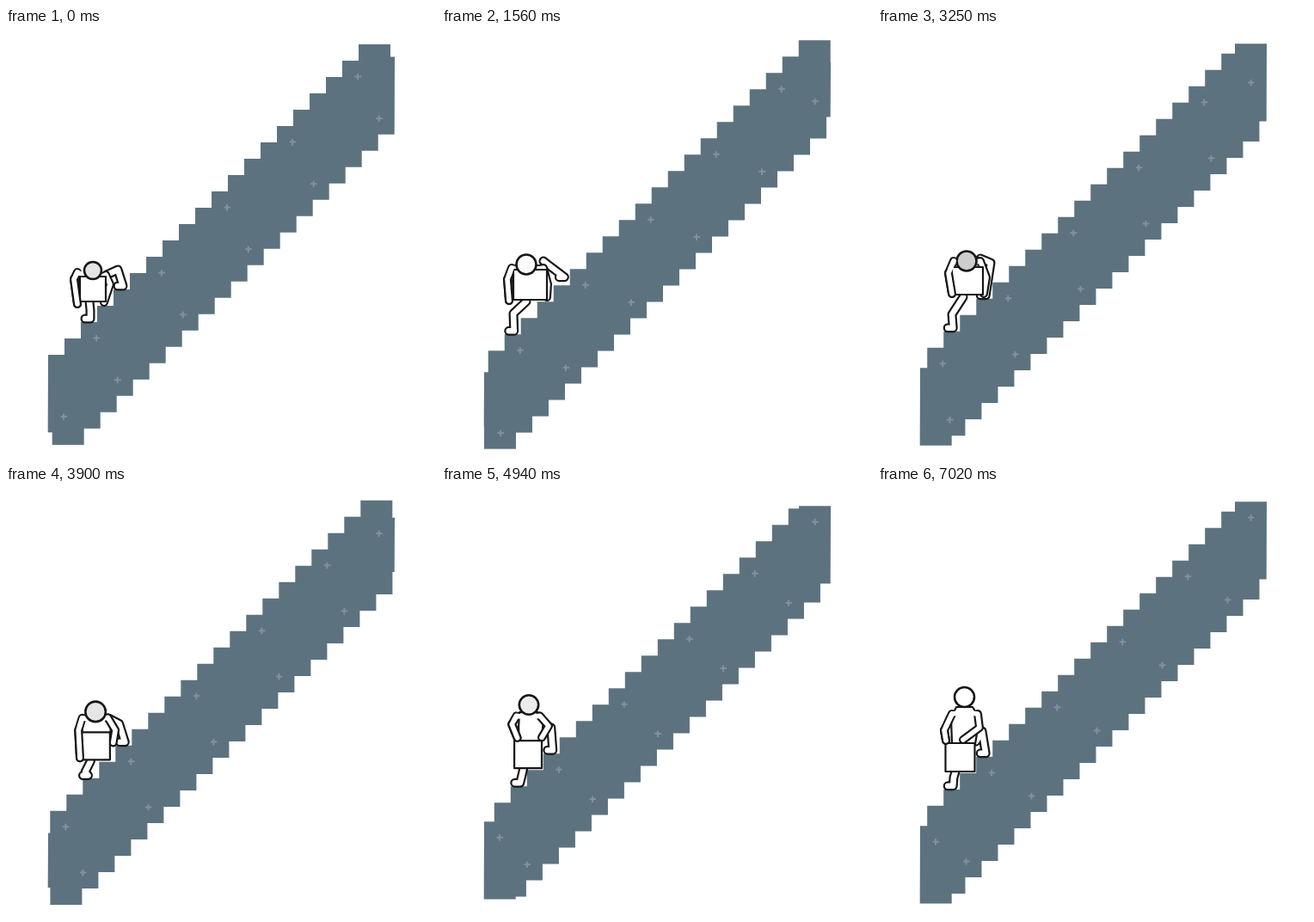
An HTML page with a canvas that plays this animation: 500x500 px, repeating every 8000 ms.

```html
<!DOCTYPE html>
<html lang="en">
<head>
<meta charset="utf-8">
<title>Climbing the endless stairs</title>
<style>
  html, body { margin: 0; width: 100%; height: 100%; overflow: hidden; background: #fff; }
  canvas { display: block; width: 100vw; height: 100vh; }
</style>
</head>
<body>
<canvas id="stage" width="500" height="500"></canvas>
<script>
const ctx = document.getElementById('stage').getContext('2d');
const LOOP = 8000, STEP = 19, ROOT2 = Math.SQRT2, INK = '#161616';

// Each pose: at = tick, shade = grey of the head, limbs as point lists.
const poses = [
  { at: 0, shade: [228], head: [101, 282, 10], box: [86, 289, 30, 29],
    torso: [86, 318, 84, 300, 86, 287, 117, 288, 118, 303, 115, 318],
    armL: [83, 284, 79, 292, 83, 321], armR: [116, 287, 121, 298, 114, 319],
    legL: [97, 318, 98, 328], legR: [117, 287, 130, 281] },
  { at: 12, shade: [250], head: [98, 275, 11.5], box: [83, 281, 39, 35],
    torso: [86, 316, 82, 295, 84, 276, 118, 276, 123, 295, 124, 316],
    armL: [81, 279, 76, 292, 78, 317], armR: [118, 279, 123, 298, 122, 313],
    legL: [98, 318, 83, 332], legR: [118, 271, 127, 278] },
  { at: 20, shade: [215], head: [97, 299, 9.5], box: [81, 297, 33, 26],
    torso: [78, 318, 76, 292, 86, 275, 107, 274, 118, 287, 117, 318],
    armL: [80, 292, 80, 313, 84, 327], armR: [114, 293, 115, 313, 113, 324],
    legL: [94, 322, 93, 332], legR: [116, 284, 125, 288] },
  { at: 25, shade: [205], head: [103, 271, 11.5], box: [86, 278, 36, 32],
    torso: [87, 308, 84, 290, 90, 268, 117, 267, 123, 285, 122, 308],
    armL: [88, 271, 82, 285, 86, 309], armR: [119, 271, 126, 290, 123, 309],
    legL: [99, 313, 86, 333], legR: [119, 268, 131, 273] },
  { at: 34, shade: [250], head: [105, 255.5, 12], box: [87.5, 293, 32.5, 32],
    torso: [92, 296, 92, 278, 94, 264, 115, 264, 121, 278, 119, 296],
    armL: [89, 269, 86, 283, 86, 322], armR: [118, 268, 128, 279, 126, 290],
    legL: [98, 325, 97, 332], legR: [120, 272, 132, 279] },
  { at: 44, shade: [215], head: [95, 253, 10], box: [79, 301, 31, 32],
    torso: [85, 300, 85, 280, 84, 262, 106, 262, 112, 278, 110, 298],
    armL: [83, 265, 74, 268, 90, 249], armR: [107, 266, 118, 279, 101, 296],
    legL: [90, 332, 88, 338], legR: [112, 298, 119, 284] },
  { at: 54, shade: [255], head: [100.5, 245.5, 11.5], box: [78.5, 299, 34, 33],
    torso: [86, 300, 85, 270, 91, 257, 110, 257, 118, 270, 113, 300],
    armL: [86, 265, 77, 284, 79, 296], armR: [116, 265, 118, 281, 99, 295],
    legL: [90, 332, 88, 339], legR: [114, 297, 121, 285] }
];

// 130 ms ticks while climbing, 260 ms while resting
function tickAt(t) {
  const n = t < 5200 ? Math.floor(t / 130) : 40 + 2 * Math.floor((t - 5200) / 260);
  return Math.min(n, 54);
}

const travel = n => 1.19 * (n >= 44 ? 41 : Math.min(n, 40));

const turn = (x, y) => [500.7 - x, 503.7 - y];

// Upper outline of the stairs, left to right, for a phase d within one step
function upperEdge(d) {
  const rising = 13.6 + (STEP - d) * ROOT2;
  const pts = [];
  for (let k = 20; k >= 0; k--) {
    const x = 415 - d - STEP * k;
    if (x + STEP <= 49) continue;
    const over = 49 - x;
    const y = over > 0 ? 380 + over * ROOT2 : 14 + d + STEP * k;
    const end = k > 0 ? x + STEP : rising < y ? 415 : 452 - d;
    pts.push([Math.max(49, x), y], [end, y]);
  }
  pts.push([pts.at(-1)[0], rising], [452, rising]);
  return pts;
}

// Closed belt: down the upper row, drop, up the lower row, rise
function beltPoint(u) {
  const v = u % 418, run = Math.min(v, 366);
  const x = 433 - run;
  const y = 32.5 + run + (v - run) * 73 / 52;
  return u >= 418 ? turn(x, y) : [x, y];
}

function drawStairs(shift) {
  const upper = upperEdge((5 + shift) % STEP);
  const lower = upper.map(([x, y]) => turn(x, y));
  trace([...upper, ...lower].flat());
  ctx.fillStyle = '#5d727f';
  ctx.fill();
  ctx.fillStyle = '#80929d';
  for (let i = 0; i < 11; i++) {
    const [x, y] = beltPoint((24 + shift + 76 * i) % 836);
    ctx.fillRect(x - 3.5, y - 1, 7.5, 2);
    ctx.fillRect(x - 1, y - 3.5, 2, 7.5);
  }
}

function poseAt(n) {
  let i = 0;
  while (i < poses.length - 2 && n >= poses[i + 1].at) i++;
  const a = poses[i], b = poses[i + 1];
  const p = (n - a.at) / (b.at - a.at);
  const pose = {};
  for (const key in a) {
    if (key !== 'at') pose[key] = a[key].map((v, j) => v + (b[key][j] - v) * p);
  }
  return pose;
}

// A foot rides its step down, then swings up to the next one
function foot(x, y, phase, lift, land, swingX, swingY) {
  const c = phase < land - STEP ? phase + STEP : phase;
  if (c <= lift) return [x + 5 - c, y - 5 + c];
  const p = (c - lift) / (land - lift);
  const arc = Math.sin(Math.PI * p);
  const ride = lift + (land - STEP - lift) * p;
  return [x + 5 - ride + swingX * arc, y - 5 + ride + swingY * arc];
}

function trace(pts) {
  ctx.beginPath();
  for (let i = 0; i < pts.length; i += 2) ctx.lineTo(pts[i], pts[i + 1]);
}

// The inner line may reach further than the ink, which leaves that end open
function limb(pts, width, inner = pts) {
  trace(pts);
  ctx.strokeStyle = INK;
  ctx.lineWidth = width;
  ctx.stroke();
  trace(inner);
  ctx.strokeStyle = '#fff';
  ctx.lineWidth = width - 4.4;
  ctx.stroke();
}

function outline(fill, width) {
  ctx.fillStyle = fill;
  ctx.fill();
  ctx.strokeStyle = INK;
  ctx.lineWidth = width;
  ctx.stroke();
}

function leg(pts, [x, y]) {
  limb([...pts, x + 3, y - 5, x - 3, y - 5], 11);
}

function drawClimber(n, shift) {
  const { head, shade, box, torso, armL, armR, legL, legR } = poseAt(n);
  const phase = (5 + shift) % STEP;
  const chest = [(torso[4] + torso[6]) / 2, torso[5] + 6];
  ctx.lineJoin = ctx.lineCap = 'round';
  leg(legR, foot(133, 305, phase, 17, 21.5, 11, -15));
  leg(legL, foot(95, 343, phase, 19.6, 23.5, 4, -8));
  trace(torso);
  outline('#fff', 2.2);
  limb(armL, 10, [...chest, ...armL]);
  limb(armR, 10, [...chest, ...armR]);
  ctx.beginPath();
  ctx.rect(...box);
  outline('#fff', 2.2);
  const g = Math.round(shade[0]);
  ctx.beginPath();
  ctx.arc(...head, 0, 2 * Math.PI);
  outline(`rgb(${g},${g},${g})`, 2.6);
  limb(armL.slice(2), 10, armL);
}

function draw(now) {
  const n = tickAt(now % LOOP), shift = travel(n);
  ctx.fillStyle = '#fff';
  ctx.fillRect(0, 0, 500, 500);
  drawStairs(shift);
  drawClimber(n, shift);
}

let start;
function frame(now) {
  start ??= now;
  draw(Math.max(0, now - start));
  requestAnimationFrame(frame);
}
draw(0);
requestAnimationFrame(frame);
</script>
</body>
</html>
```
